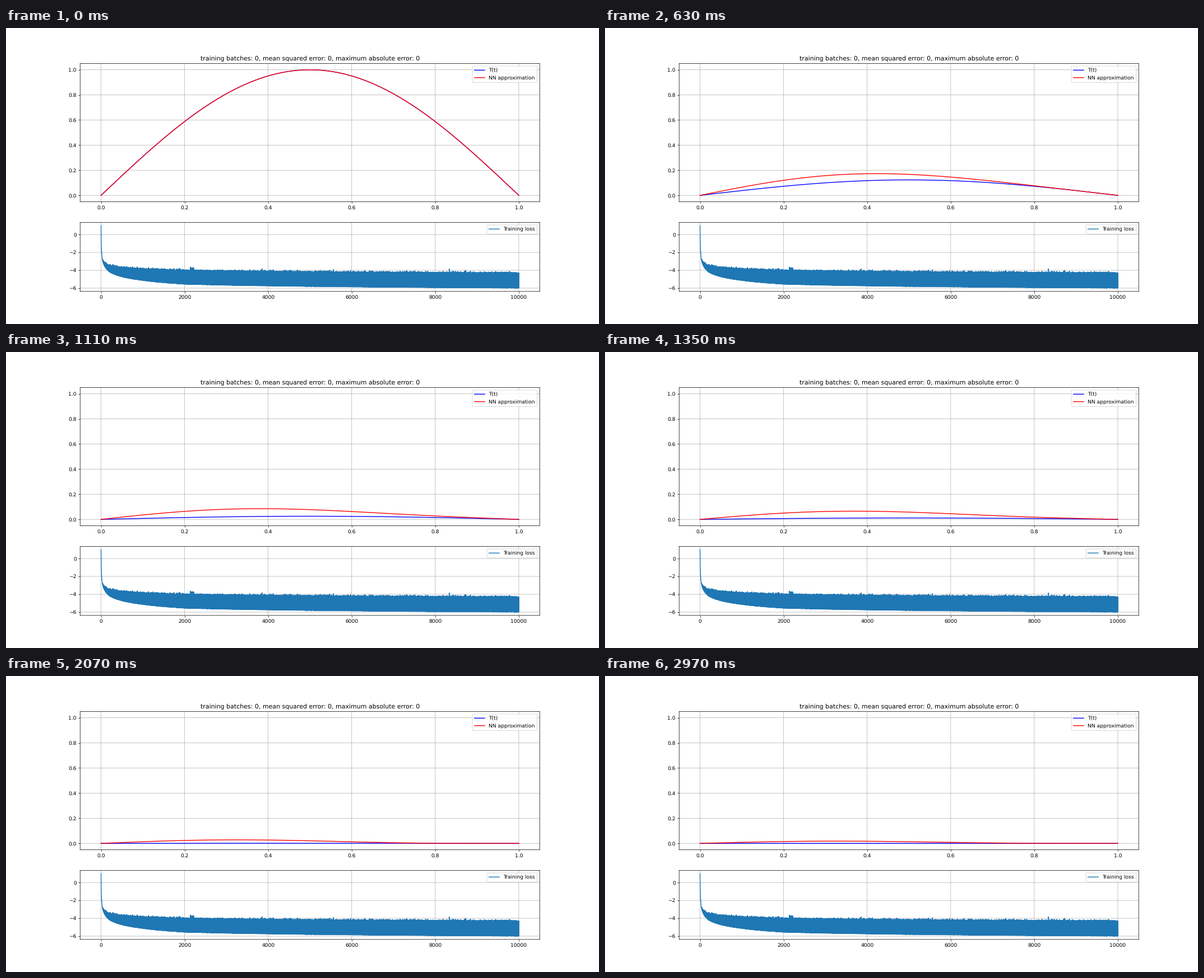
Recreate the animation shown at these times as a matplotlib script. Size 1058x529 px, loop 3 s.

```python
import numpy as np
import matplotlib.pyplot as plt
from matplotlib.animation import FuncAnimation

FRAMES, INTERVAL = 100, 30
BATCHES = 10000

plt.rcParams["text.hinting"] = "none"


def exact(x, i):
    """Heat equation: a sine arch that decays exponentially."""
    return np.exp(-np.pi ** 2 * i / (FRAMES - 1)) * np.sin(np.pi * x)


def approx(x, i):
    """Exact solution plus a network error in the first two sine modes."""
    arch = (1 - np.exp(-i / 4)) * (.013 + .04 * np.exp(-((i - 34) / 26) ** 2))
    skew = (1 - np.exp(-i / 8)) * .034 * np.exp(-i / 65)
    return exact(x, i) + arch * np.sin(np.pi * x) + skew * np.sin(2 * np.pi * x)


def training_loss():
    """Noisy log loss that fills the band between two envelopes."""
    rng = np.random.default_rng(4)
    batch = np.arange(0, BATCHES + 1, 2)
    knots = np.log1p([0, 30, 200, 2000, BATCHES])
    high = np.interp(np.log1p(batch), knots, [1, -2.7, -3.35, -3.9, -4.2])
    low = np.interp(np.log1p(batch), knots, [1, -2.75, -4.2, -5.58, -6.02])

    settle = np.clip(batch / 200, 0, 1)
    high += settle * (rng.exponential(.045, batch.size) - .13)
    high += .3 * np.exp(-((batch - 2180) / 40) ** 2)
    low += settle * (rng.exponential(.02, batch.size) + .02)
    return batch, np.where(batch // 2 % 2, low, high)


fig, (ax, ax_loss) = plt.subplots(
    2, 1, figsize=(16, 8), dpi=66.125, gridspec_kw={"height_ratios": [2, 1]})

x = np.linspace(0, 1, 101)
true_line, = ax.plot(x, exact(x, 0), "b", label="T(t)")
net_line, = ax.plot(x, approx(x, 0), "r", label="NN approximation")
ax.set_xlim(-.05, 1.05)
ax.set_ylim(-.05, 1.05)
ax.set_title("training batches: 0, mean squared error: 0, maximum absolute error: 0")

ax_loss.plot(*training_loss(), label="Training loss")
ax_loss.set_xlim(-500, 10500)
ax_loss.set_ylim(-6.37, 1.36)
ax_loss.set_yticks([-6, -4, -2, 0])

for a in (ax, ax_loss):
    a.grid(True)
    a.legend(loc="upper right")

# Soft, unsnapped edges for grid, spines and legends
fig.draw_without_rendering()
for artist in fig.findobj():
    artist.set_snap(False)


def update(i):
    true_line.set_ydata(exact(x, i))
    net_line.set_ydata(approx(x, i))
    return true_line, net_line


anim = FuncAnimation(fig, update, frames=FRAMES, interval=INTERVAL,
                     init_func=lambda: update(0), repeat=True, repeat_delay=0)
plt.show()
```
